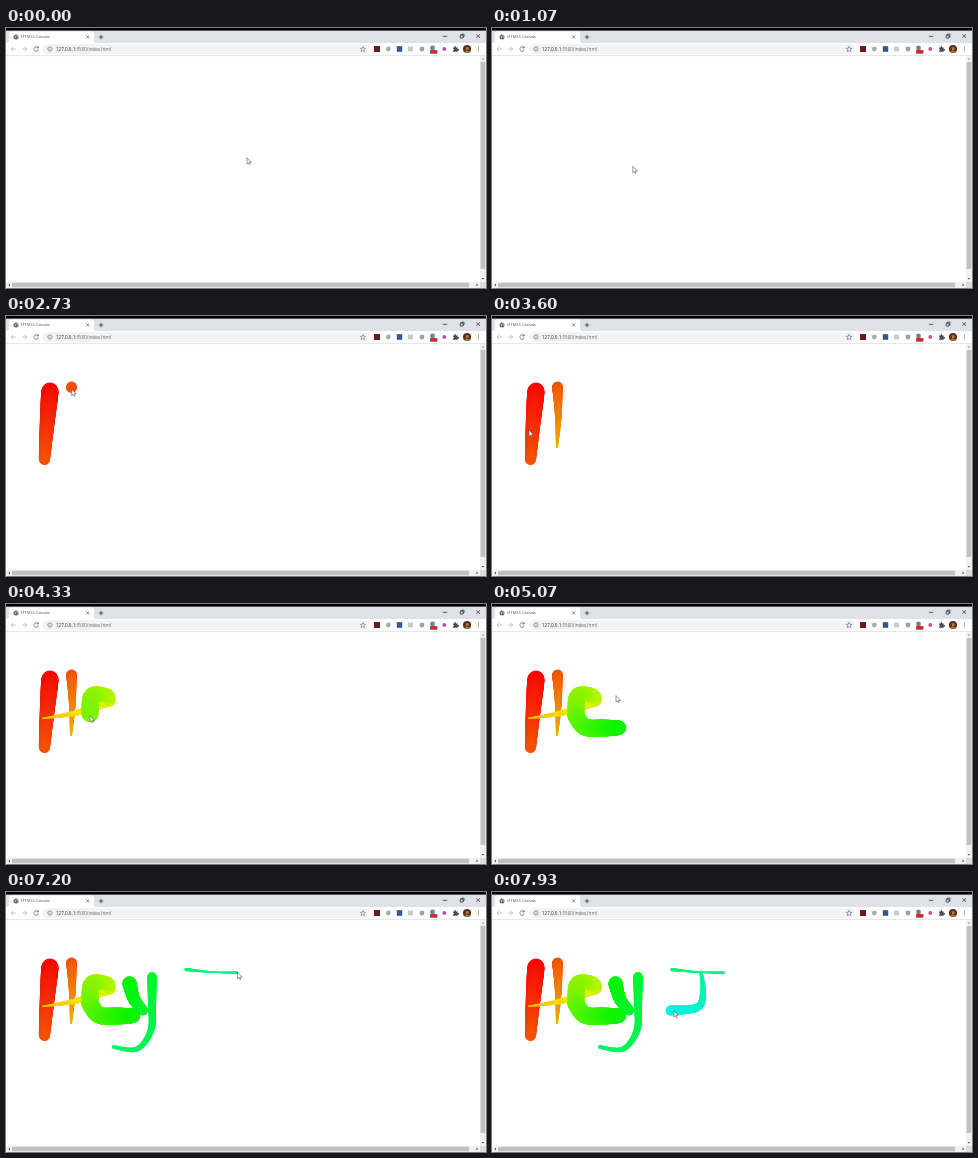
Recreate the animation shown at these times as an HTML page with a canvas. Size 480 by 260 pixels, loop 8000 ms.

```html
<!DOCTYPE html>
<html lang="en">
<head>
<meta charset="utf-8">
<title>HTML5 Canvas</title>
<style>
  html, body { margin: 0; width: 100%; height: 100%; overflow: hidden; background: #fff; }
  svg, canvas { position: absolute; left: 0; top: 0; width: 480px; height: 260px; display: block; }
  text { font-family: "Open Sans", "Noto Sans", sans-serif; }
  .line { fill: none; stroke: #5f6368; stroke-width: .8; }
  .thin { stroke-width: .6; }
  .dark { stroke: #333; }
  .off { stroke: #b4b7ba; }
</style>
</head>
<body>
<svg viewBox="0 0 480 260">
  <rect width="480" height="260" fill="#fff"/>
  <!-- tab strip -->
  <rect width="480" height="15" fill="#dee1e6"/>
  <rect width="480" height="2.6" fill="#000"/>
  <path d="M1 15Q3 15 3 13V5.5Q3 3.5 5 3.5H86Q88 3.5 88 5.5V13Q88 15 90 15Z" fill="#fff"/>
  <circle cx="10" cy="9" r="2.5" fill="#5f6368"/>
  <path d="M8.3 8.2l1.6.8-.4 1.3M10.8 7.2l.3 1.2 1 .5" fill="none" stroke="#fff" stroke-width=".6"/>
  <text x="15.3" y="10.4" font-size="4.15" fill="#45494d">HTML5 Canvas</text>
  <path class="line" d="M80.2 7.4l3 3m0-3l-3 3"/>
  <path class="line dark" d="M92.7 9h4.6M95 6.7v4.6"/>
  <path class="line dark" d="M437.2 8.3h4M454.2 7.2h2.8v2.8h-2.8zM455.2 7.2v-1h2.8v2.8h-1M470.4 6.3l3.6 3.6m0-3.6l-3.6 3.6"/>
  <!-- toolbar -->
  <path d="M0 27.6H480" stroke="#dcdee1" stroke-width=".8"/>
  <rect x="37" y="16.3" width="326" height="9.6" rx="4.8" fill="#f1f3f4"/>
  <path class="line off" d="M9.7 21H5M7.2 18.8L5 21l2.2 2.2M16 21h4.7M18.5 18.8l2.2 2.2-2.2 2.2"/>
  <path class="line" d="M32 19.6A2.3 2.3 0 1 0 32.4 21.6M32.3 18.3v1.7h-1.7"/>
  <circle class="line thin" cx="44" cy="21" r="2.2"/>
  <path class="line thin" d="M44 20.7v1.5M44 19.5v.6"/>
  <text x="50" y="22.7" font-size="4.55" fill="#5f6368"><tspan fill="#202124">127.0.0.1</tspan>:5500/index.html</text>
  <path class="line thin" d="M357 18.5l.8 1.7 1.9.2-1.4 1.3.4 1.9-1.7-1-1.7 1 .4-1.9-1.4-1.3 1.9-.2z"/>
  <!-- extension buttons -->
  <rect x="368" y="18" width="6" height="6" fill="#6a1a1c"/>
  <circle cx="382.3" cy="21" r="2.4" fill="#a9adb0"/>
  <rect x="390.8" y="18.2" width="5.4" height="5.6" fill="#34558b"/>
  <rect x="402" y="18.5" width="5" height="5" fill="#c8cacc"/>
  <circle cx="416" cy="21" r="2.4" fill="#9a9ea1"/>
  <circle cx="426.5" cy="20" r="2.4" fill="#5f8a98"/>
  <rect x="424" y="22" width="7.4" height="3.8" rx=".8" fill="#c5302c"/>
  <circle cx="438.3" cy="21" r="1.9" fill="#d64a8a"/>
  <path d="M447 19.5h1.5q-.3-1.5.8-1.5t.8 1.5h1.6v1.5q1.4-.2 1.4.8t-1.4.8v1.2H447v-1.4q1-.1 1-.8t-1-.8z" fill="#4a4e52"/>
  <circle cx="461" cy="21" r="4" fill="#5b2a1c"/>
  <circle cx="461.2" cy="20.5" r="1.6" fill="#b87850"/>
  <path d="M458.2 23.8Q461 20.8 463.8 23.8Q461 26.2 458.2 23.8Z" fill="#8f7a30"/>
  <path d="M472.5 19v4.2" stroke="#5f6368" stroke-width="1.2" stroke-linecap="round" stroke-dasharray="0 2"/>
  <!-- scrollbars -->
  <path d="M474 28H480V260H0V254H474Z" fill="#f1f1f1"/>
  <rect x="474" y="254" width="6" height="6" fill="#dcdcdc"/>
  <rect x="474.6" y="34" width="4.8" height="207" fill="#c1c1c1"/>
  <rect x="6" y="254.7" width="457" height="4.6" fill="#c1c1c1"/>
  <path d="M475.6 31.6L477 30l1.4 1.6z" fill="#8a8a8a"/>
  <path d="M475.6 250L477 251.6l1.4-1.6zM4 255.6L2.4 257 4 258.4zM470.5 255.6l1.6 1.4-1.6 1.4z" fill="#505050"/>
</svg>
<canvas id="pad" width="480" height="260"></canvas>
<script>
const LOOP = 8000, STEP = LOOP / 120, LAG = 40;
const ctx = document.getElementById('pad').getContext('2d');
const arrow = new Path2D('M0 0V6L1.4 4.8 2.4 6.8 3.2 6.4 2.4 4.4H4.2Z');

const clamp = k => Math.max(0, Math.min(1, k));
const ease = k => k * k * (3 - 2 * k);

// Pointer paths in order of time; each move sets out from where the last path ended.
const paths = [];
let spot = [241, 130], hue = 0;

function move(t0, t1, ...pts) {
  paths.push({ t0, t1, pts: [spot, ...pts] });
  spot = pts[pts.length - 1];
}

// A stroke also carries the hue on, from the last stroke's end to the given one.
function ink(t0, t1, end, ...pts) {
  paths.push({ t0, t1, pts, from: hue, to: end });
  spot = pts[pts.length - 1];
  hue = end;
}

move(0, 530, [205, 126]);
move(590, 670, [240, 204]);
move(800, 1330, [44, 75]);
// H
ink(1800, 2200, 19, [44, 75], [41, 109], [38.4, 143.5]);
move(2330, 2600, [65.5, 71]);
ink(2660, 3130, 43, [65.5, 71], [66.3, 101], [65, 131]);
move(3200, 3590, [37, 114.3]);
ink(3640, 4000, 68, [37, 114.3], [72, 108.5], [104, 97]);
// e
ink(4000, 4340, 92, [104, 97], [101, 91.5], [86, 92], [84, 112]);
ink(4340, 4870, 118, [84, 112], [93, 123], [110, 124], [127, 123.8]);
move(4920, 5066, [124, 92]);
// y
ink(5130, 5400, 130, [123.5, 91.5], [128, 107], [137, 118.5]);
move(5410, 5500, [146, 85]);
ink(5530, 6130, 147, [146, 85], [146, 111], [145, 138], [131, 157], [107.5, 155]);
move(6340, 6400, [170, 120.5]);
move(6470, 6690, [180, 77.5]);
// J
ink(6730, 7200, 156, [180, 77.5], [205, 80], [231.5, 80.8]);
move(7260, 7370, [209, 80]);
ink(7400, 7900, 175, [209, 80], [211, 98], [206, 115], [178.5, 118.5]);
move(7900, 7930, [182, 119]);

// Brush width swings with the hue: thinnest at 44 and 152, widest halfway between.
const width = h => Math.min(17, 1.4 + .38 * Math.min(Math.abs(h - 44), Math.abs(h - 152)));

// Catmull-Rom point at share u of the way through pts
function along(pts, u) {
  const last = pts.length - 1;
  const i = Math.min(last - 1, Math.floor(u * last)), k = u * last - i;
  const b = pts[i], c = pts[i + 1], a = pts[i - 1] || b, d = pts[i + 2] || c;
  return [0, 1].map(n => b[n] + .5 * k * (c[n] - a[n] +
    k * (2 * a[n] - 5 * b[n] + 4 * c[n] - d[n] + k * (3 * (b[n] - c[n]) + d[n] - a[n]))));
}

const share = (p, t) => ease(clamp((t - p.t0) / (p.t1 - p.t0)));

function drawStroke({ pts, from, to }, upTo) {
  const n = 80;
  for (let i = 0; i < n * upTo; i++) {
    const h = from + (to - from) * i / n;
    ctx.strokeStyle = `hsl(${h},97%,48.5%)`;
    ctx.lineWidth = width(h);
    ctx.beginPath();
    ctx.moveTo(...along(pts, i / n));
    ctx.lineTo(...along(pts, Math.min(upTo, (i + 1) / n)));
    ctx.stroke();
  }
}

function drawPointer(t) {
  const now = paths.filter(p => p.t0 <= t).pop();
  ctx.save();
  ctx.translate(...along(now.pts, share(now, t)));
  ctx.fillStyle = '#fff';
  ctx.strokeStyle = '#555';
  ctx.lineWidth = .6;
  ctx.fill(arrow);
  ctx.stroke(arrow);
  ctx.restore();
}

function draw(t) {
  ctx.clearRect(0, 0, 480, 260);
  ctx.lineCap = 'round';
  for (const p of paths) if (p.to) drawStroke(p, share(p, t - LAG));
  drawPointer(t);
}

function tick() {
  const t = (performance.now() + 4) % LOOP;
  draw(Math.floor(t / STEP) * STEP);
  requestAnimationFrame(tick);
}
tick();
</script>
</body>
</html>
```
